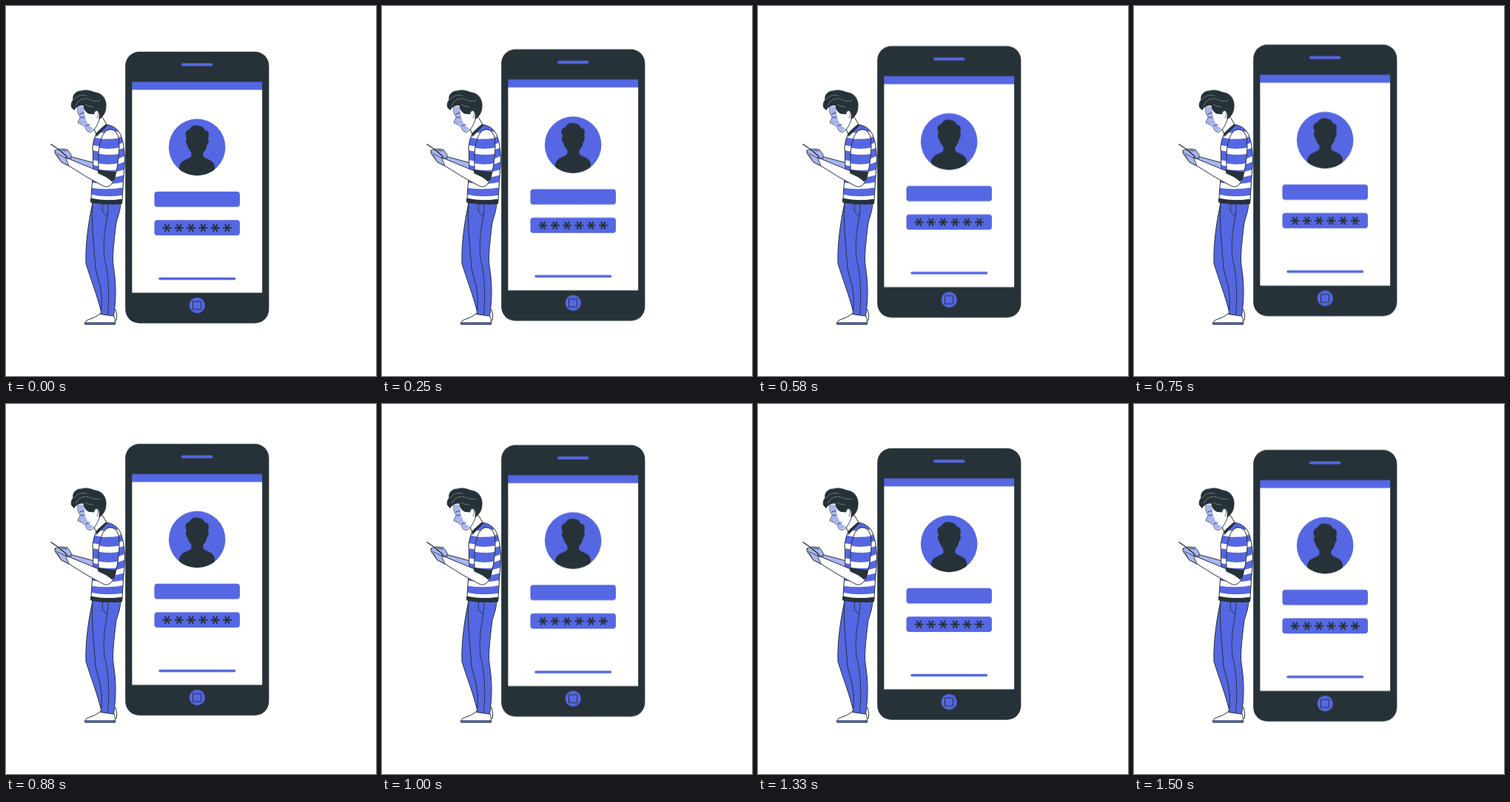
Animation of 500x500 px, one loop 1.54 s. Source, as an HTML page without scripts:

```html
<!DOCTYPE html>
<html lang="en">
<head>
<meta charset="utf-8">
<title>Sign in</title>
<style>
  html, body { margin: 0; width: 100%; height: 100%; overflow: hidden; background: #fff; }
  svg { display: block; width: 100%; height: 100%; }
  .blue { fill: #5567e2; }
  .dark { fill: #263238; }
  .tint { fill: #a9b5f2; }
  .white { fill: #fff; }
  .ink { stroke: #263238; stroke-width: 1; stroke-linejoin: round; stroke-linecap: round; }
  .line { fill: none; }
  .bands { fill: none; stroke: #fff; stroke-width: 7; stroke-linecap: butt; }
  .phone { animation: float 1540ms linear infinite; }
  @keyframes float {
    0%, 100% { transform: translateY(0); }
    48.05% { transform: translateY(-9.75px); }
    97.4% { transform: translateY(.25px); }
  }
</style>
</head>
<body>
<svg viewBox="0 0 500 500">
  <defs>
    <path id="star" d="M-6 0H6M-3 -5L3 5M3 -5L-3 5" fill="none" stroke="#263238" stroke-width="1.9"/>
    <path id="shirt" d="M122 172L135 160C146 162 153 167 156 177C161 192 161 209 159.500 225C158 241 158 252 156.500 267Q134 269 115 265C115 250 117 235 118 220C117 209 118 199 117 191Q118 180 122 172Z"/>
    <path id="sleeve" d="M139 167C149 166 153 174 153 187C153 203 151 215 148.500 226L125 222C125 206 124 191 129 179Q132 169 139 167Z"/>
    <clipPath id="disc"><circle cx="258.2" cy="190.9" r="38.3"/></clipPath>
    <clipPath id="inShirt"><use href="#shirt"/></clipPath>
    <clipPath id="inSleeve"><use href="#sleeve"/></clipPath>
  </defs>

  <g class="phone">
    <rect class="dark" x="161.2" y="61.8" width="194.2" height="366.9" rx="19"/>
    <rect class="white" x="170.4" y="113" width="175.8" height="274.5"/>
    <rect class="blue" x="170.4" y="102.5" width="175.8" height="10.8"/>
    <rect class="blue" x="237" y="77.2" width="42.5" height="4" rx="2"/>
    <circle class="blue" cx="258.2" cy="190.9" r="38.3"/>
    <path class="dark" clip-path="url(#disc)" d="M248 167C250 161.500 257 160 263 162.500C267 164 268 166 268.500 168C274 168 275 174 273 179C275 182 273 187 271.500 188C271 193 268.500 196 266.500 198V203C270 208 282.300 207 282.300 219V232H234V219C235 207 247 208 250.500 203V198C248 195 245.500 191 245 188C243 186 242 181 244.500 179C241 174 242 168 248 167Z"/>
    <rect class="blue" x="200.5" y="250.8" width="115.500" height="20.700" rx="4"/>
    <rect class="blue" x="200.5" y="289.3" width="115.500" height="20.700" rx="4"/>
    <use href="#star" x="217.5" y="299.8"/>
    <use href="#star" x="233.8" y="299.8"/>
    <use href="#star" x="250.1" y="299.8"/>
    <use href="#star" x="266.4" y="299.8"/>
    <use href="#star" x="282.7" y="299.8"/>
    <use href="#star" x="299" y="299.8"/>
    <rect class="blue" x="206.3" y="366.7" width="104" height="3.600" rx="1.800"/>
    <circle class="blue" cx="258.3" cy="404.6" r="10.600"/>
    <rect class="line ink" x="252.9" y="399.200" width="10.800" height="10.800" stroke-width="1.2"/>
  </g>

  <g class="ink">
    <!-- shoes and trousers -->
    <path class="white" d="M143 411L148 410Q150.500 418 149.500 424L145 426Z"/>
    <path class="blue" d="M117 266C112 290 107 320 108 348C114 368 123 390 129 415L137 410L134 330Z"/>
    <path class="white" d="M128 415.500L145.500 418Q148.500 423 147.300 430H107Q106 425.500 111 424Q121 421 128 415.500Z"/>
    <path class="blue" d="M107 427.800H147.500V430.300H107Z" stroke-width=".7"/>
    <path class="blue" d="M117 266H155C154 281 150 286 148.500 296C146 318 143.500 338 145 350C149 375 149 396 145.500 419L128 416.500C130 404 130 392 127 378L121 355C119 325 115 292 117 266Z"/>
    <path class="line" d="M131 268Q127 279 137 284M138.500 268L137 284C133 303 131 325 133 340C139 366 140 390 137.500 417" stroke-width=".9"/>

    <!-- far arm -->
    <path class="tint" d="M119 212L86 203L80 207L118 223Z"/>

    <!-- neck -->
    <path class="white" d="M119 166L122 174L136 160L130 150L121 152Z"/>

    <!-- shirt -->
    <use href="#shirt" class="blue" stroke="none"/>
    <g clip-path="url(#inShirt)" class="bands">
      <path d="M114 172Q138 180 162 170" stroke-width="8"/>
      <path d="M114 191Q138 197 162 187M114 211Q138 217 162 206M114 228Q138 232 162 224M114 242Q138 246 162 241"/>
      <path d="M114 257Q136 262 160 258" stroke-width="5"/>
    </g>
    <path class="dark" d="M115 260.500Q136 264.500 157 261.500L156.500 267Q134 269 115 265Z"/>
    <use href="#shirt" class="line"/>
    <path class="dark" d="M122 172L135 160L136.500 161.500L122.500 176Z"/>

    <!-- near arm -->
    <path class="white" d="M125 223L147 232C144 241 140 245 133 244Q109 232 85 216L75 211L66 199Q65 195 70 196L84 206Z"/>
    <use href="#sleeve" class="blue" stroke="none"/>
    <g clip-path="url(#inSleeve)" class="bands">
      <path d="M122 172Q140 174 156 171" stroke-width="14"/>
      <path d="M122 195Q138 199 156 195M122 216Q138 220 156 216" stroke-width="8"/>
    </g>
    <use href="#sleeve" class="line"/>
    <path class="dark" d="M125 222L148.500 225Q148 233 143.500 237Q136 230 125 226Z"/>
    <path class="tint" d="M66 195L74 193L83 194L88 201V206L80 204L85 216L75 211Z" stroke-width=".9"/>
    <path class="line" d="M61 187L70 193L82 203" stroke-width="1.500"/>
    <path class="line" d="M75 195L82 196M70 200L84 207" stroke-width=".8"/>

    <!-- head -->
    <path class="white" d="M97 136Q96 146 100.500 150L97 157.500L102.500 160L107 164Q109 170 113 170.500C119 170 123 162 126 154L127 139L106 130Z" stroke-width=".9"/>
    <path class="tint" stroke="none" d="M97.500 136Q96.500 146 101 150L97.500 157L103 159.500L108 166L113 169.500L119 166Q112 163 109 156Q105 147 106 136Z"/>
    <path class="line" d="M100.500 150Q103 152.500 106 149.500M100 146L105 144M108 162L113 160" stroke-width=".9"/>
    <path class="dark" d="M92 140C86 137 88 130 91 127C89 120 96 114 102 115C109 112 117 116 121 117C131 118 136 128 135 136C135 144 131 149 126 153Q128 142 122 141Q119 142 119 146L111 145Q105 141 105 134Q97 133 92 140Z"/>
    <path class="white" d="M119 145Q121 140 124 142Q126 146 123 151" stroke-width=".7"/>
    <path class="line" d="M92 127Q98 118 109 121M94 134Q101 122 112 126Q119 130 127 128M107 133Q112 137 118 136" style="stroke:#8b9499;stroke-width:.7"/>
  </g>
</svg>
</body>
</html>
```
